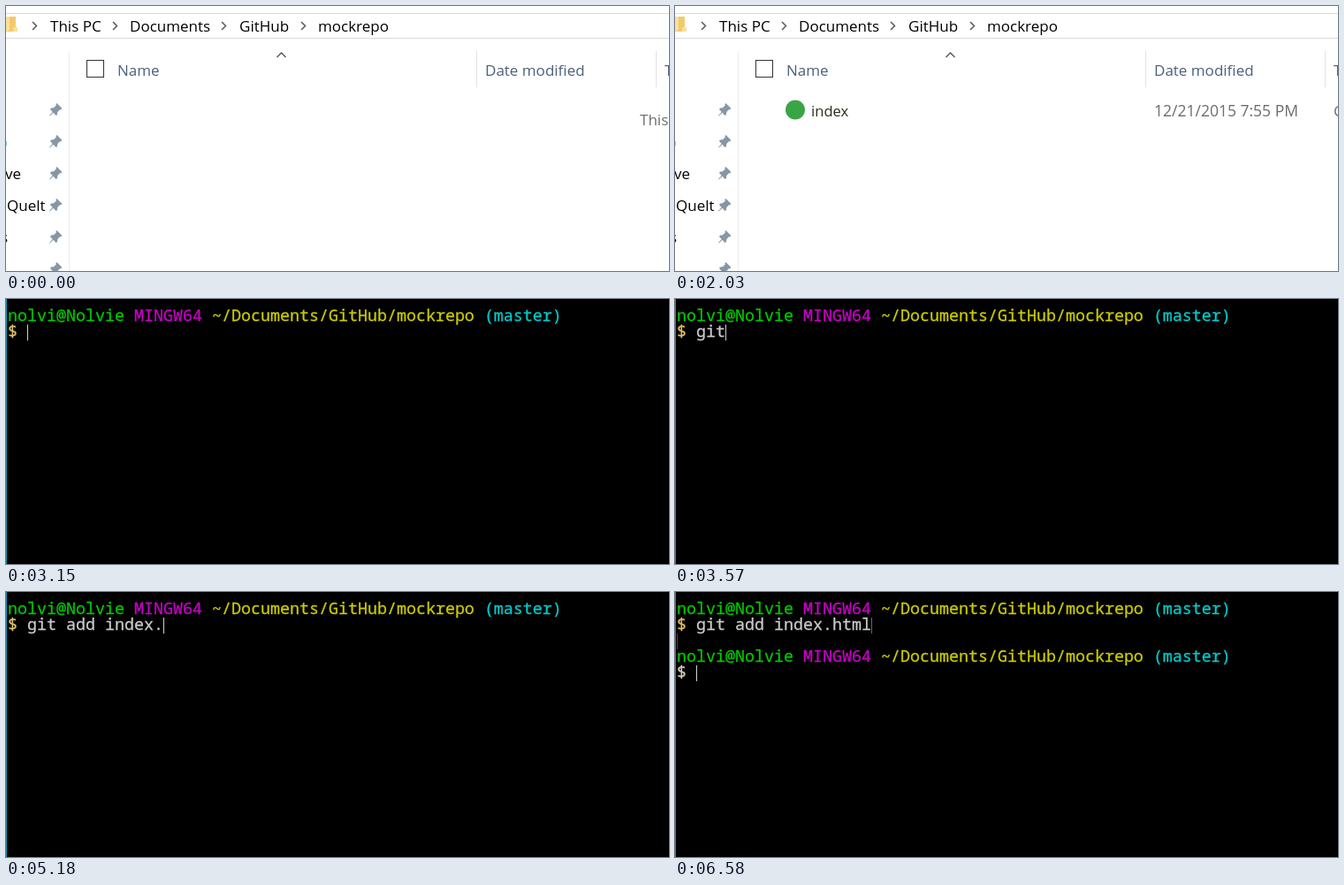
Write an HTML page that moves like this. It is 750 px wide and 300 px high and loops after 7210 ms.

```html
<!DOCTYPE html>
<html lang="en">
<head>
<meta charset="utf-8">
<title>Stage a file with git</title>
<style>
html, body { margin: 0; width: 100%; height: 100%; overflow: hidden; background: #fff; }
svg { display: block; width: 750px; height: 300px; }
text { white-space: pre; }
#explorer { font: 17px "Open Sans", "Noto Sans", sans-serif; }
#terminal { font: 18.333px "Noto Sans Mono", "DejaVu Sans Mono", monospace; }
.crisp { shape-rendering: crispEdges; }
.head { fill: #4c607a; }
.dim { fill: #6d6d6d; }
.line { fill: none; stroke: #5a5a5a; stroke-width: 1.5; }
.ink { fill: currentColor; stroke: currentColor; stroke-width: .3px; }
.user { color: #00c800; }
.sys { color: #c800c8; }
.path { color: #cccc00; }
.branch { color: #00cccc; }
.typed { color: #cacaca; }
</style>
</head>
<body>
<svg viewBox="0 0 750 300">
  <defs>
    <path id="pin" fill="#8796a5" d="M8.5 0 14.5 6 13 7.5 12.2 7 9.3 10 9 13 7.5 14 4.6 10.8.5 14.5 0 14 3.7 9.9 1 7 2 5.5 5 5.3 8 2.3 7.2 1.4Z"/>
    <path id="chevron" class="line" stroke-width="2" d="M0 0 4.5 4.5 0 9"/>
    <g id="prompt">
      <text x="2" y="25"><tspan class="ink user">nolvi@Nolvie</tspan> <tspan class="ink sys">MINGW64</tspan> <tspan class="ink path">~/Documents/GitHub/mockrepo</tspan> <tspan class="ink branch">(master)</tspan></text>
      <text class="ink" x="2" y="43">$</text>
    </g>
  </defs>

  <g id="explorer">
    <rect width="750" height="300" fill="#fff"/>
    <g class="crisp">
      <path fill="none" stroke="#d9d9d9" d="M0 8.5H750M0 36.5H750"/>
      <path fill="none" stroke="#e2e2e2" d="M532.5 51V92M735.5 51V92"/>
      <path fill="none" stroke="#ededed" d="M71.5 51V300"/>
    </g>
    <path fill="#f0ca6c" d="M0 12H11V29H0Z"/>
    <path fill="#fbe09a" d="M0 12H4V27L0 30ZM8 24H13V29H8Z"/>
    <g id="chevrons"></g>
    <text x="50" y="29">This PC</text>
    <text x="140" y="29">Documents</text>
    <text x="264" y="29">GitHub</text>
    <text x="353" y="29">mockrepo</text>

    <path class="line" stroke-width="1" d="M306.5 58 311.5 53 316.5 58"/>
    <rect class="crisp" x="91.5" y="61.5" width="19" height="19" fill="#fff" stroke="#333"/>
    <g class="head">
      <text x="126" y="79">Name</text>
      <text x="542" y="79">Date modified</text>
      <text x="745" y="79">Type</text>
    </g>

    <g id="pins"></g>
    <rect y="153" width="1" height="5" fill="#62dfe0"/>
    <text x="-1" y="196">ve</text>
    <text x="1" y="232">Quelt</text>
    <text x="-6" y="268">s</text>

    <text id="empty" class="dim" x="717" y="135">This folder is empty.</text>
    <g id="file">
      <g id="selection">
        <rect class="crisp" x="95.5" y="101.5" width="660" height="32" fill="#cce8ff" stroke="#99d1ff"/>
        <rect class="crisp" x="101.5" y="107.5" width="19" height="19" fill="#fff" stroke="#333"/>
        <path fill="none" stroke="#222" stroke-width="2" d="M105 117 109.5 121.5 117.5 112.5"/>
      </g>
      <circle cx="136" cy="117.5" r="11" fill="#3aa545"/>
      <text x="154" y="125" font-size="16.6" fill="#26301c">index</text>
      <g class="dim">
        <text x="542" y="125" font-size="17.5">12/21/2015 7:55 PM</text>
        <text x="745" y="125">C</text>
      </g>
    </g>
  </g>

  <g id="terminal">
    <rect width="750" height="300"/>
    <rect class="crisp" width="1" height="300" fill="#0b94b4"/>
    <use href="#prompt" color="#e0c068"/>
    <text id="typed" class="ink typed" x="24" y="43"></text>
    <rect id="trail" class="crisp" x="222" y="29" width="1" height="18" fill="#666"/>
    <g id="next">
      <rect class="crisp" x="2" y="47" width="1" height="18" fill="#444"/>
      <use href="#prompt" y="54" color="#d6d0b8"/>
    </g>
    <rect id="cursor" class="crisp" width="1" height="18"/>
  </g>
</svg>
<script>
const LOOP = 7210;
const SELECT = 1050, DESELECT = 2030, SHELL = 2520;
const BLINK_OFF = 2660, BLINK_ON = 3150, ENTER = 6370, DONE = 6580;
const COMMAND = "git add index.html";
const KEYS = [3360, 3500, 3570, 3780, 3850, 4060, 4200, 4340, 4410,
  4690, 4830, 4970, 5110, 5180, 5530, 5600, 5740, 6020];
const CELL = 11, ROW = 18;

const $ = id => document.getElementById(id);
const show = (id, on) => $(id).setAttribute("display", on ? "inline" : "none");
const stamp = (id, spots) => {
  $(id + "s").innerHTML = spots.map(([x, y]) => `<use href="#${id}" x="${x}" y="${y}"/>`).join("");
};

stamp("chevron", [30, 121, 244, 334].map(x => [x, 18]));
stamp("pin", Array.from({ length: 6 }, (_, i) => [49, 110 + 36 * i]));

function placeCursor(t, count) {
  const cursor = $("cursor");
  let x = 24 + CELL * count, row = 1;
  if (t >= DONE) { x = 24; row = 4; }
  else if (t >= ENTER) { x = 2; row = 2; }
  cursor.setAttribute("x", x);
  cursor.setAttribute("y", 11 + ROW * row);
  cursor.setAttribute("fill", t < BLINK_OFF ? "#bfbf00" : "#d0d0d0");
  show("cursor", t < BLINK_OFF || t >= BLINK_ON);
}

function draw(t) {
  const count = KEYS.filter(k => k <= t).length;
  show("explorer", t < SHELL);
  show("terminal", t >= SHELL);
  show("empty", t < SELECT);
  show("file", t >= SELECT);
  show("selection", t < DESELECT);
  $("typed").textContent = COMMAND.slice(0, count);
  show("trail", t >= ENTER);
  show("next", t >= DONE);
  placeCursor(t, count);
}

const start = performance.now();
function tick() {
  draw((performance.now() - start) % LOOP);
  requestAnimationFrame(tick);
}
tick();
</script>
</body>
</html>
```
